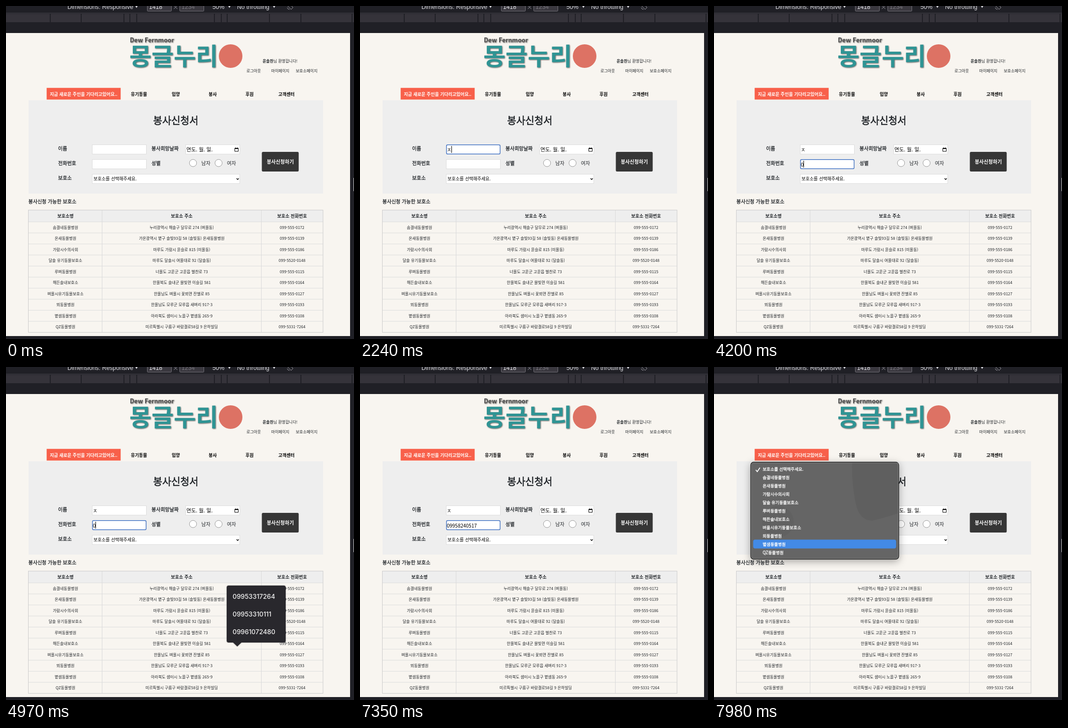
Write an HTML page that moves like this. It is 708 px wide and 678 px high and loops after 8 s.

```html
<!DOCTYPE html>
<html lang="ko">
<head>
<meta charset="utf-8">
<style>
html, body { margin: 0; width: 100%; height: 100%; overflow: hidden; background: #202026; }
svg { display: block; }
text { font-family: "Noto Sans CJK KR", "Noto Sans CJK", sans-serif; white-space: pre; fill: currentColor; }
.medium { stroke: currentColor; stroke-width: .03em; }
.tool { font-family: "Liberation Sans", Arial, sans-serif; }
.hint { font-family: Inter, sans-serif; font-weight: 500; }
.sign { font-weight: 900; filter: drop-shadow(1px 1px 1px #0009); }
</style>
</head>
<body>
<svg id="stage" width="708" height="678" viewBox="0 0 708 678"></svg>
<script>
const stage = document.getElementById('stage');

function add(tag, attrs, parent = stage) {
  const el = document.createElementNS('http://www.w3.org/2000/svg', tag);
  for (const key in attrs) el.setAttribute(key, attrs[key]);
  parent.appendChild(el);
  return el;
}
const group = () => add('g', {});
const rect = (x, y, width, height, fill, more, parent) =>
  add('rect', { x, y, width, height, fill, ...more }, parent);
const path = (d, more, parent) => add('path', { d, fill: 'none', ...more }, parent);
const line = (d, stroke, parent) => path(d, { stroke }, parent);

// y is the middle of the glyphs
function label(str, x, y, size, more, parent) {
  const el = add('text', { x, y: y + size * 0.37, 'font-size': size, color: '#212529', ...more }, parent);
  el.textContent = str;
  return el;
}
const mid = { 'text-anchor': 'middle' };
const bold = { 'font-weight': 700 };
const medium = { class: 'medium' };
const show = (el, on) => el.setAttribute('visibility', on ? 'visible' : 'hidden');

const shelters = [
  ['솜결네동물병원', '누리광역시 해솔구 달무로 274 (벼울동)', '099-555-0172'],
  ['온새동물병원', '가온광역시 볕구 솔빛93길 58 (솔빛동) 온새동물병원', '099-555-0139'],
  ['가람시수의사회', '마루도 가람시 윤슬로 815 (미울동)', '099-555-0186'],
  ['달솔 유기동물보호소', '마루도 달솔시 여울대로 92 (달솔동)', '099-5520-0148'],
  ['루벼동물병원', '너울도 고운군 고운읍 별찬로 73', '099-555-0115'],
  ['해든솔내보호소', '한울북도 솔내군 물빛면 이슬길 581', '099-555-0164'],
  ['벼울시유기동물보호소', '한울남도 벼울시 꽃뫼면 잔별로 85', '099-555-0127'],
  ['뫼동물병원', '한울남도 모루군 모루읍 새벼리 917-3', '099-555-0193'],
  ['볕샘동물병원', '아라북도 샘터시 노을구 볕샘동 265-9', '099-555-0108'],
  ['QZ동물병원', '미르특별시 구름구 바람결로58길 9 은하빌딩', '099-5331-7264']
];
const user = '윤솔찬';
const prompt = '보호소를 선택해주세요.';

function drawToolbar() {
  rect(0, 0, 708, 678, '#202026');
  rect(0, 14, 708, 1, '#45434a');
  rect(0, 16, 708, 17, '#35333a');
  for (const x of [90, 153, 240, 252, 266, 424, 438, 450, 536, 600, 704])
    rect(x - 1, 16, 2, 17, '#202026');
  const tool = (str, x, color) => label(str, x, 1, 12.2, { class: 'tool', color });
  for (const x of [287, 353])
    rect(x + .5, -8.5, 49, 19, '#3a383f', { stroke: '#747279', rx: 1 });
  tool('Dimensions: Responsive', 125, '#dcdce0');
  tool('1418', 291, '#e4e4e8');
  tool('1234', 357, '#77757c');
  tool('50%', 420, '#dcdce0');
  tool('No throttling', 470, '#dcdce0');
  for (const x of [265.5, 454.5, 545.5])
    path(`M${x - 3} -1h6l-3 5z`, { fill: '#dcdce0' });
  line('M341.500 -1l7 7m0 -7l-7 7', '#98969d');
  line('M573 0l4 -4 7 7 -4 4zM572 3q1 4 5 4', '#98969d');
  rect(707, 350, 1, 27, '#c8c8c8');
}

function drawHeader() {
  rect(0, 55, 700, 617, '#f8f5f0');
  label('Dew Fernmoor', 252, 69, 12.3, { class: 'sign', color: '#4b4b4b' });
  label('몽글누리', 251, 102, 49, { class: 'sign', color: '#2f9494' });
  add('circle', { cx: 457, cy: 102, r: 24, fill: '#dd7264' });

  const hello = label('', 522, 112, 8);
  add('tspan', bold, hello).textContent = user;
  add('tspan', {}, hello).textContent = '님 환영합니다!';
  [['로그아웃', 504], ['마이페이지', 558], ['보호소페이지', 611.5]]
    .forEach(([str, x]) => label(str, x, 132, 8, mid));

  rect(82.7, 166.7, 150.6, 23.8, '#f8604a');
  label('지금 새로운 주인을 기다리고있어요..', 158, 180, 9, { ...mid, ...bold, color: '#fff' });
  [['유기동물', 270.5], ['입양', 345.5], ['봉사', 420.5], ['후원', 495.5], ['고객센터', 570.5]]
    .forEach(([str, x]) => label(str, x, 180, 9, { ...mid, ...bold, color: '#000' }));
}

function drawForm() {
  rect(46, 192, 599, 190, '#eeeeee');
  label('봉사신청서', 345.5, 234, 20, { ...mid, ...medium });
  [['이름', 106, 290], ['전화번호', 106, 320], ['보호소', 106, 350],
   ['봉사희망날짜', 296, 290], ['성별', 296, 320]]
    .forEach(([str, x, y]) => label(str, x, y, 10, medium));
  [[175, 282, 110], [175, 312, 110], [365, 282, 110], [175, 342, 300]]
    .forEach(([x, y, w]) => rect(x + .5, y + .5, w, 19, '#fff', { stroke: '#dedede' }));
  label('연도. 월. 일.', 367, 292, 10.5, { color: '#000' });
  path('M465.500 289.500h7v6.500h-7zM465.500 290.500h7M467 288v2M471 288v2', { stroke: '#000' });
  for (const [x, str] of [[380.5, '남자'], [432.5, '여자']]) {
    add('circle', { cx: x, cy: 319.7, r: 7.3, fill: '#fff', stroke: '#848484', 'stroke-width': .8 });
    label(str, x + 17, 320, 10);
  }
  label(prompt, 178, 352, 9, { color: '#000' });
  path('M469 351l2.300 2.300 2.300 -2.300', { stroke: '#000', 'stroke-width': 1.3 });
  rect(520.5, 297, 75, 40, '#363636', { rx: 2.5 });
  label('봉사신청하기', 558, 317, 10, { ...mid, ...bold, color: '#fff' });
}

function drawTable() {
  label('봉사신청 가능한 보호소', 45.5, 398, 10, medium);
  rect(46, 416, 599, 23, '#eeeeee');
  for (let i = 0; i < 10; i++) rect(46, 439 + i * 22.5, 599, 1, '#dedede');
  line('M195.500 416v248M519.500 416v248', '#dadada');
  rect(45.5, 415.5, 599.5, 249, 'none', { stroke: '#cdcdcd' });
  const columns = [121, 357.5, 582];
  ['보호소명', '보호소 주소', '보호소 전화번호']
    .forEach((str, i) => label(str, columns[i], 428, 9, { ...mid, ...bold }));
  shelters.forEach((row, r) => row.forEach((str, i) =>
    label(str, columns[i], 451 + r * 22.5, 8, mid)));
}

function makeHint(items, y, width, tip) {
  const g = group();
  g.style.filter = 'drop-shadow(0 0 1px #0006)';
  rect(449, y, width, items.length * 36 + 8, '#29282d', { rx: 4 }, g);
  path(tip, { fill: '#29282d' }, g);
  g.rows = items.map((str, i) =>
    label(str, 461, y + 22.5 + i * 36, 13, { class: 'hint', color: '#f4f4f4' }, g));
  return g;
}

function makeMenu() {
  const g = group();
  const box = rect(74.8, 193.8, 301, 197.4, '#656565', { rx: 6, stroke: '#222', 'stroke-width': 1.4 }, g);
  box.style.filter = 'drop-shadow(0 4px 8px #0005)';
  path('M281 195H375V298Q350 306 322 313Q296 312 289 280Q280 240 281 195z', { fill: '#5f5f5f' }, g);
  add('circle', { cx: 130, cy: 315, r: 32, fill: '#616161' }, g);
  rect(76, 195, 298.6, 195, 'none', { rx: 5, stroke: '#8a8a8a', 'stroke-width': .8 }, g);
  g.mark = rect(79.7, 351.6, 290.8, 17.8, '#438ae6', { rx: 4 }, g);
  [prompt, ...shelters.map(s => s[0])].forEach((str, i) =>
    label(str, 99, 208 + i * 17, 8.5, { ...medium, color: '#fff' }, g));
  path('M85 209.500l3 3.500 5.500 -8', { stroke: '#fff', 'stroke-width': 1.7 }, g);
  return g;
}

function makeField(y) {
  return {
    ring: rect(176, y + .6, 109, 18.8, '#fff', { rx: 2.5, stroke: '#2b62bd', 'stroke-width': 1.2 }),
    text: label('', 176.7, y + 11.4, 10, { color: '#000' }),
    caret: rect(177, y + 3, 1, 14, '#000')
  };
}

drawToolbar();
drawHeader();
drawForm();
drawTable();
const nameField = makeField(282);
const phoneField = makeField(312);
const composing = rect(177, 330, 9, 1, '#000');
const nameHint = makeHint([user], 562, 85, 'M463 562l8 -8 8 8z');
const phoneHint = makeHint(['09953317264', '09953310111', '09961072480'], 445, 120,
  'M462 561l8.500 8 8.500 -8z');
const menu = makeMenu();

const phone = '09958240517';
// [start time, number of digits typed]
const typing = [[3850, 0], [4200, 1], [4340, 2], [4620, 1], [4760, 0], [4970, 1], [5040, 2],
  [5180, 3], [5320, 4], [5530, 5], [5740, 6], [5880, 7], [5950, 8], [6370, 9], [6580, 10], [6790, 11]];

function phoneText(t) {
  if (t < 2800) return '';
  if (t < 3850) return 'ㅈ';
  return phone.slice(0, typing.filter(s => s[0] <= t).pop()[1]);
}

function setField(field, str, focused, caretOn) {
  field.text.textContent = str;
  show(field.ring, focused);
  show(field.caret, focused && caretOn);
  field.caret.setAttribute('x', Math.round(176.6 + (str === 'ㅈ' ? 9.2 : str.length * 5.55)));
}

function draw(t) {
  const within = (a, b) => t >= a && t < b;
  setField(nameField, t >= 2170 ? 'ㅈ' : '', within(1260, 2310), true);
  setField(phoneField, phoneText(t), within(2310, 7840), t < 7350);
  show(composing, within(2800, 3640));
  show(nameHint, within(1820, 2170));
  const hinting = within(2310, 2870) || within(4970, 5600);
  show(phoneHint, hinting);
  show(phoneHint.rows[2], hinting && t < 5320);
  show(menu, t >= 7840);
  show(menu.mark, t >= 7910);
}

const start = performance.now();
function tick() {
  draw((performance.now() - start) % 8000);
  requestAnimationFrame(tick);
}
tick();
</script>
</body>
</html>
```
